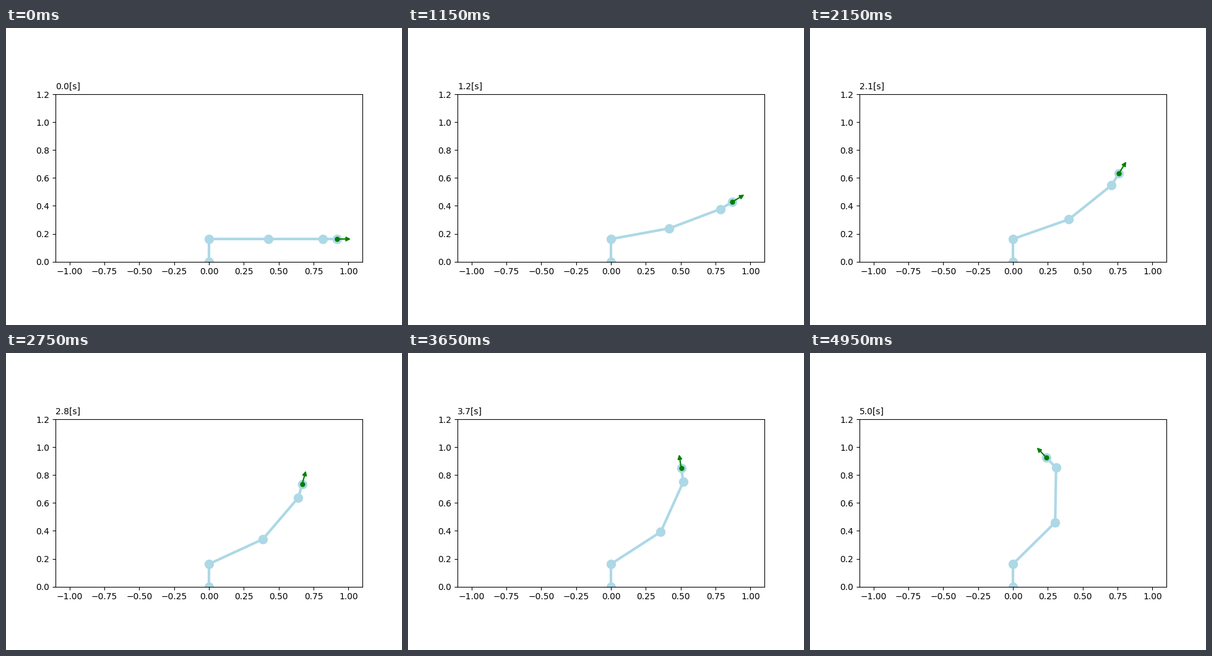
These frames come from a looping animation (640 by 480 pixels, 5 s). A matplotlib script:

```python
import numpy as np
import matplotlib.pyplot as plt
from matplotlib.animation import FuncAnimation
from matplotlib.patches import FancyArrowPatch

FRAMES = 100
STEP = 0.05                    # seconds per frame
BASE = 0.1625                  # height of the shoulder joint
LINKS = np.array([0.425, 0.3922, 0.0997])
ARROW = 0.1
SPEED = np.pi / 20             # every joint turns at this rate, rad/s

fig, ax = plt.subplots(figsize=(6.4, 4.8), dpi=100)
ax.set_aspect("equal")
ax.set_xlim(-1.1, 1.1)
ax.set_ylim(0, 1.2)

arm, = ax.plot([], [], "o-", color="lightblue", lw=3, ms=10)
hand, = ax.plot([], [], "o", color="green", ms=5)
pointer = FancyArrowPatch((0, 0), (1, 0), arrowstyle="-|>", mutation_scale=10,
                          color="green", lw=1.5, shrinkA=0, shrinkB=0, zorder=3)
ax.add_patch(pointer)
clock = ax.text(0, 1.03, "", transform=ax.transAxes, fontsize=10)


def joints(t):
    """Joint positions and the heading of the last link at time t."""
    angles = SPEED * t * np.arange(1, len(LINKS) + 1)
    x = np.cumsum(LINKS * np.cos(angles))
    y = BASE + np.cumsum(LINKS * np.sin(angles))
    return np.r_[0, 0, x], np.r_[0, BASE, y], angles[-1]


def update(i):
    t = i * STEP
    x, y, heading = joints(t)
    tip = np.array([x[-1], y[-1]])
    arm.set_data(x, y)
    hand.set_data(x[-1:], y[-1:])
    pointer.set_positions(
        tip, tip + ARROW * np.array([np.cos(heading), np.sin(heading)]))
    clock.set_text(f"{t:.1f}[s]")
    return arm, hand, pointer, clock


anim = FuncAnimation(fig, update, frames=FRAMES, interval=1000 * STEP,
                     repeat=True, repeat_delay=0, blit=False)
plt.show()
```
